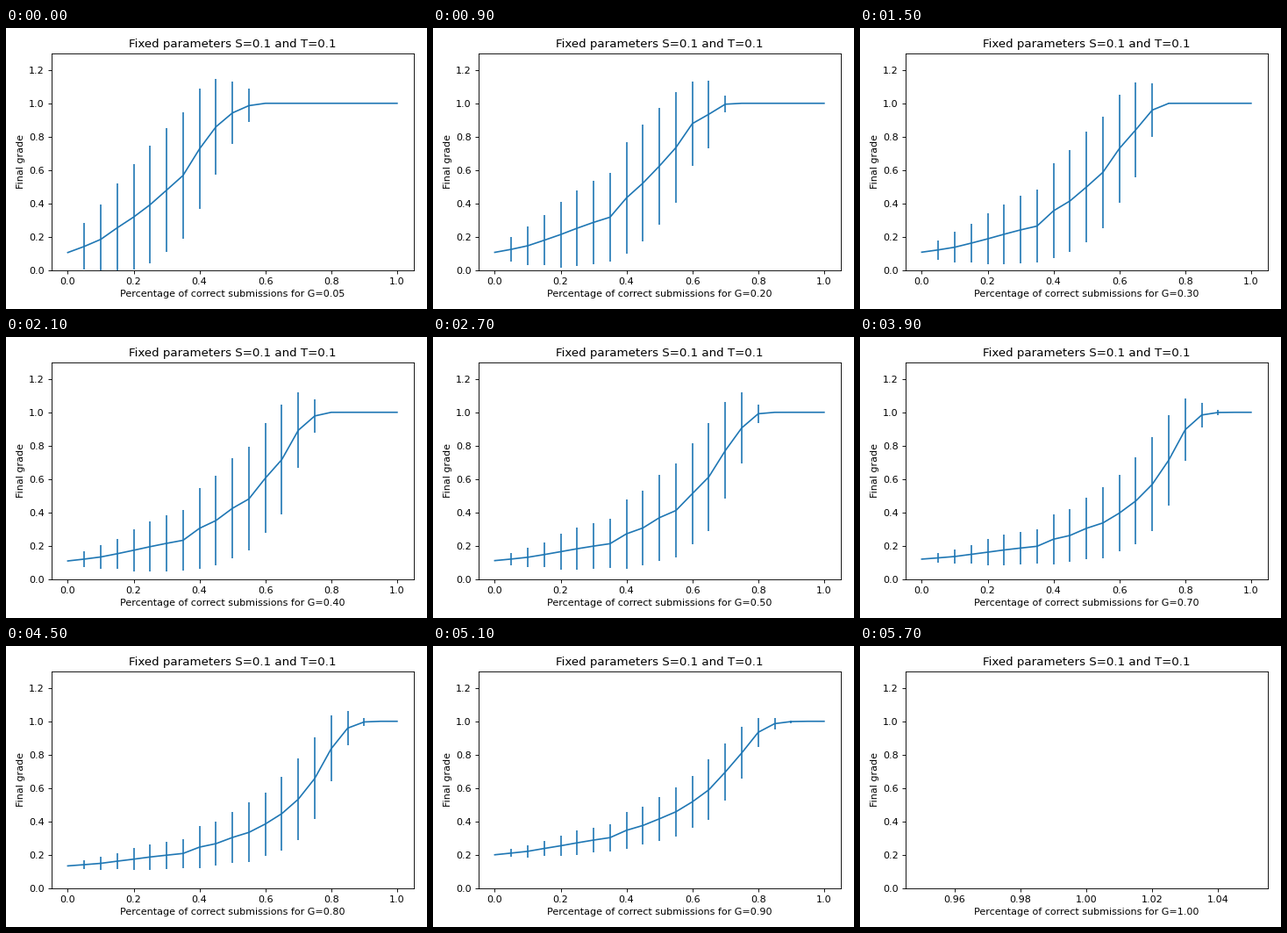
Recreate the animation shown at these times as a matplotlib script. Size 480 by 320 pixels, loop 6000 ms.

```python
import matplotlib.pyplot as plt
import numpy as np
from matplotlib.animation import FuncAnimation

W, H, DPI = 480, 320, 80
FRAMES, INTERVAL = 20, 300
SLIP, LEARN = 0.05, 0.1
STEPS, LEARNERS = 100, 400
P = np.linspace(0, 1, 21)


def grades(g):
    """Mean and deviation of the final grade over simulated learners."""
    rng = np.random.default_rng(7)
    odds = np.full((LEARNERS, P.size), LEARN)
    for _ in range(STEPS):
        correct = rng.random(odds.shape) < P
        odds *= np.where(correct, (1 - SLIP) / g, SLIP / (1 - g))
        odds = (odds + LEARN) / (1 - LEARN)
    grade = odds / (1 + odds)
    return grade.mean(axis=0), grade.std(axis=0)


# at G=1 only the all-correct point is defined, so nothing is drawn
CURVES = [grades((i + 1) / FRAMES) for i in range(FRAMES - 1)]

left, right, top, bottom = 51.66, 464.66, 28.75, 275.75
fig = plt.figure(figsize=(W / DPI, H / DPI), dpi=DPI, facecolor="white")
ax = fig.add_axes([left / W, 1 - bottom / H,
                   (right - left) / W, (bottom - top) / H])


def draw(i):
    ax.clear()
    if i < len(CURVES):
        mean, std = CURVES[i]
        ax.errorbar(P, mean, yerr=std, color="#1f77b4", lw=1.5, elinewidth=1.5)
        ax.set_xlim(-0.05, 1.05)
    else:
        ax.set_xlim(0.945, 1.055)
    ax.set_ylim(0, 1.3)
    ax.set_title("Fixed parameters S=0.1 and T=0.1")
    ax.set_xlabel("Percentage of correct submissions "
                  f"for G={(i + 1) / FRAMES:.2f}")
    ax.set_ylabel("Final grade")
    return []


anim = FuncAnimation(fig, draw, frames=FRAMES, interval=INTERVAL,
                     init_func=lambda: draw(0), repeat=True, repeat_delay=0)
plt.show()
```
